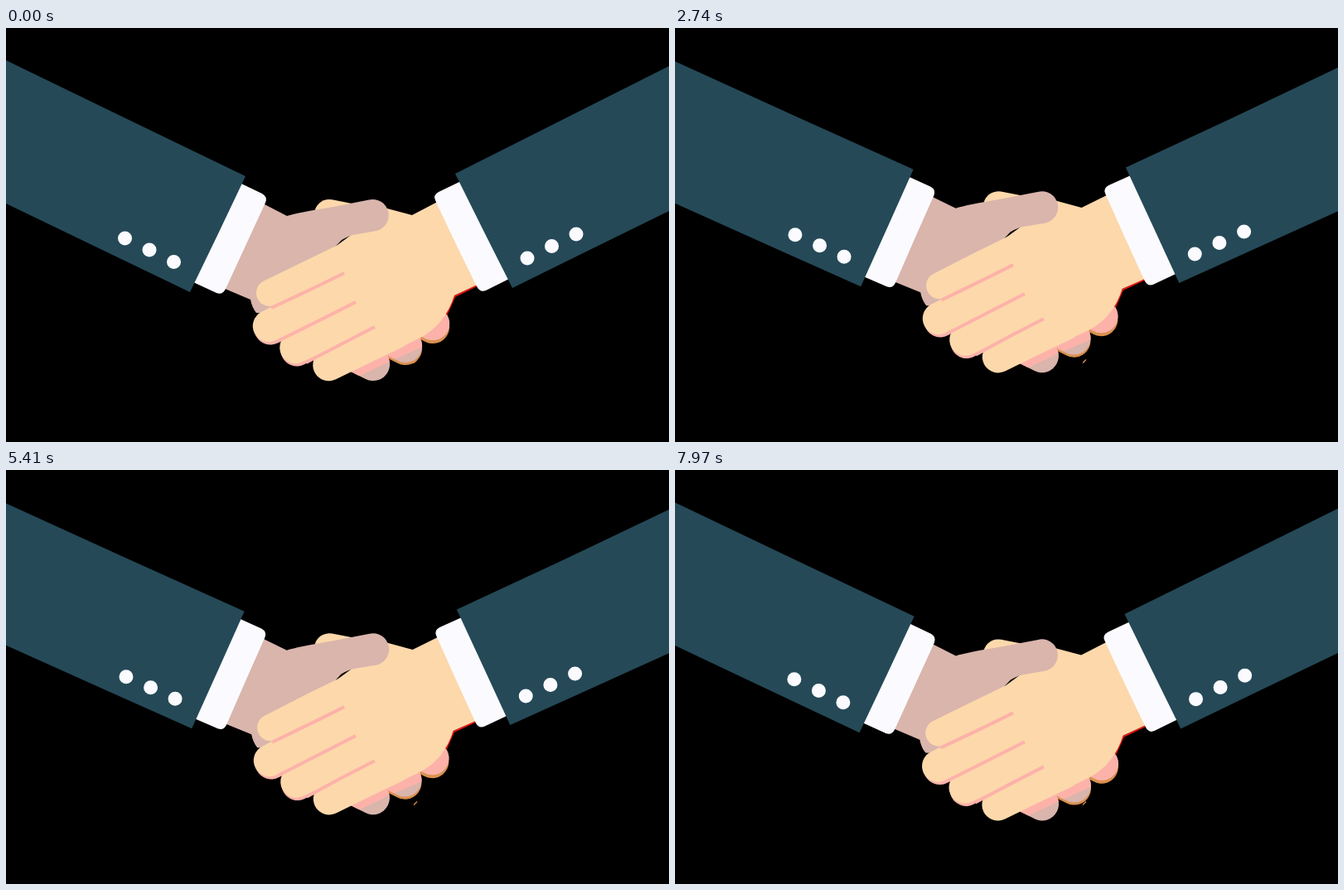
Write an HTML page with a canvas that moves like this. It is 800 by 500 pixels and loops after 8 s.

```html
<!DOCTYPE html>
<html lang="en">
<head>
<meta charset="utf-8">
<title>Handshake</title>
<style>
  html, body { margin: 0; width: 100%; height: 100%; overflow: hidden; background: #000; }
  canvas { display: block; width: 100vw; height: 100vh; }
</style>
</head>
<body>
<canvas id="stage" width="800" height="500"></canvas>
<script>
const ctx = document.getElementById('stage').getContext('2d');
const LOOP = 8000, FPS = 30, HALF_SHAKE = 10; // frames from lowest to highest pose

const SUIT = '#254957', WHITE = '#fbfbff', MAUVE = '#d9b5ac', SKIN = '#fdd8ab',
      PINK = '#fcb2a9', ORANGE = '#db9150', RED = '#e8150c';

// A rounded fingertip pointing down and to the right.
const fingertip = (x, y) =>
  `M${x + 9} ${y - 18}A20 20 0 0 1 ${x - 9} ${y + 18}l-44 -22 18 -36z`;
const dots = points => points.map(([x, y]) => `M${x} ${y}l0.01 0`).join('');

// Every shape is a pair of paths: [lowest pose, highest pose].
const shapes = {
  backThumb: ['M390 225L440 235', 'M390 131.5L440 139'],
  tips: [
    [fingertip(515, 357), fingertip(508, 271)],
    [fingertip(482, 384), fingertip(476, 292)],
    [fingertip(443, 406), fingertip(441, 311)]
  ],
  tipEdges: [
    [fingertip(515, 361), fingertip(508, 275)],
    [fingertip(482, 387), fingertip(476, 296)]
  ],
  tipShade: [
    'M400 420L425 421L463 403L503 385L540 385L540 340L460 375Z',
    'M405 325L422 325L460 308L496 299L530 300L530 255L455 285Z'
  ],
  wristEdge: [
    'M568 311L541.5 324L532 345', 'M553 241L528.5 247L525 262'
  ],
  palm: [
    'M530 205L490 226L460 218L400 262L345 335L345 360L380 400L410 415L455 396L500 374Q530 358 541 323L575 307Z',
    'M535 130L496 138.5L463 129L402 170L352 245L352 275L385 310L412 320L452 301L492 287Q522 275 528 246L560 239Z'
  ],
  leftHand: [
    'M285 190L312 213L339 227Q352 223 395 216L438 207.5A19 19 0 0 1 447 245L424 249Q415 250 405 256L320 345L302 344Q297 338 295 328L262 314Z',
    'M280 115L305 130L337 137Q350 130 395 121.5L444 114.5A19 19 0 0 1 450 152.5L428 156Q415 157 400 165L330 260L313 259Q308 254 306 245L277 237Z'
  ],
  fingerShade: [
    ['M319 363L345 350', 'M329 276L352 261'],
    ['M351 389L380 374', 'M360 298L385 284']
  ],
  firstFinger: ['M318 320Q371 294 425 268', 'M328 235Q374 197 429 172'],
  fingers: [
    ['M317 360Q363 337 410 314', 'M327 273Q372 243 420 222'],
    ['M349.5 386Q395 364 440 343', 'M359 296Q400 268 442 252'],
    ['M389.5 407Q430 387 470 368', 'M395 312.5Q430 290 470 274']
  ],
  creases: [
    ['M320 338Q366 317 408 296', 'M331 249Q370 221 409 201'],
    ['M328 378Q375 355 422 331', 'M340 287Q380 256 422 235'],
    ['M362 404Q404 382 445 361', 'M371 312Q408 282 444 267']
  ],
  cuffs: [
    ['M284 188L309 200Q316 204 313 211Q289 263 265 315Q261 323 254 320L226 307Z',
     'M273 112L301 118Q309 120 307 127Q288 185 277 240Q275 248 268 246L243 241Z'],
    ['M549 185L522 198Q515 202 518 208Q543 262 568 312Q572 320 579 317L607 303Z',
     'M563 115L534 120Q527 122 529 130Q544 185 553 243Q554 250 561 248L585 244Z']
  ],
  sleeves: [
    ['M-2 38Q144 109 289 179Q256 249 222 319Q110 265 -2 211Z',
     'M-2 50.5Q138 80 276 100Q259 176 243 253Q120 236 -2 210Z'],
    ['M802 45Q671 111 542 176Q576 245 611 314Q706 267 802 220Z',
     'M802 62.5Q695 91 560 105Q578 180 585 257Q695 243 802 224Z']
  ],
  buttons: [
    dots([[143.5, 254], [173, 268], [202.5, 282.5], [629, 278], [658.5, 263.5], [688, 249]]),
    dots([[157.5, 213], [188, 218], [217.5, 223.5], [612, 229], [643, 224.5], [674.5, 220]])
  ]
};

// Whole numbers must stay whole, since arc flags accept only 0 or 1.
const NUMBER = /-?\d+(\.\d+)?/g;
function blend([low, high], lift) {
  const ends = high.match(NUMBER);
  let i = 0;
  return low.replace(NUMBER, n => +(+n + (ends[i++] - n) * lift).toFixed(3));
}

function draw(lift) {
  const path = pair => new Path2D(blend(pair, lift));
  const fill = (pair, color) => { ctx.fillStyle = color; ctx.fill(path(pair)); };
  const stroke = (pair, color, width, cap = 'round') => {
    Object.assign(ctx, { strokeStyle: color, lineWidth: width, lineCap: cap });
    ctx.stroke(path(pair));
  };

  ctx.fillStyle = '#000';
  ctx.fillRect(0, 0, 800, 500);
  const speck = 'M492 404.5L496 400.5';
  stroke([speck, speck], ORANGE, 1.2, 'butt');

  stroke(shapes.backThumb, SKIN, 36);
  shapes.tipEdges.forEach(s => fill(s, ORANGE));
  shapes.tips.forEach(s => fill(s, MAUVE));
  ctx.save();
  const mask = new Path2D();
  shapes.tips.forEach(s => mask.addPath(path(s)));
  ctx.clip(mask);
  fill(shapes.tipShade, PINK);
  ctx.restore();

  stroke(shapes.wristEdge, RED, 2);
  fill(shapes.palm, SKIN);
  fill(shapes.leftHand, MAUVE);
  shapes.fingerShade.forEach(s => stroke(s, PINK, 39));
  stroke(shapes.firstFinger, SKIN, 32);
  shapes.fingers.forEach(s => stroke(s, SKIN, 38.5));
  shapes.creases.forEach(s => stroke(s, PINK, 4, 'butt'));

  shapes.cuffs.forEach(s => fill(s, WHITE));
  shapes.sleeves.forEach(s => fill(s, SUIT));
  stroke(shapes.buttons, WHITE, 17);
}

const start = performance.now();
function tick() {
  const time = (performance.now() - start) % LOOP;
  const step = Math.floor(time * FPS / 1000 + 0.15) % (2 * HALF_SHAKE);
  const x = 1 - Math.abs(step / HALF_SHAKE - 1);
  draw(x * x * (3 - 2 * x));
  requestAnimationFrame(tick);
}
tick();
</script>
</body>
</html>
```
